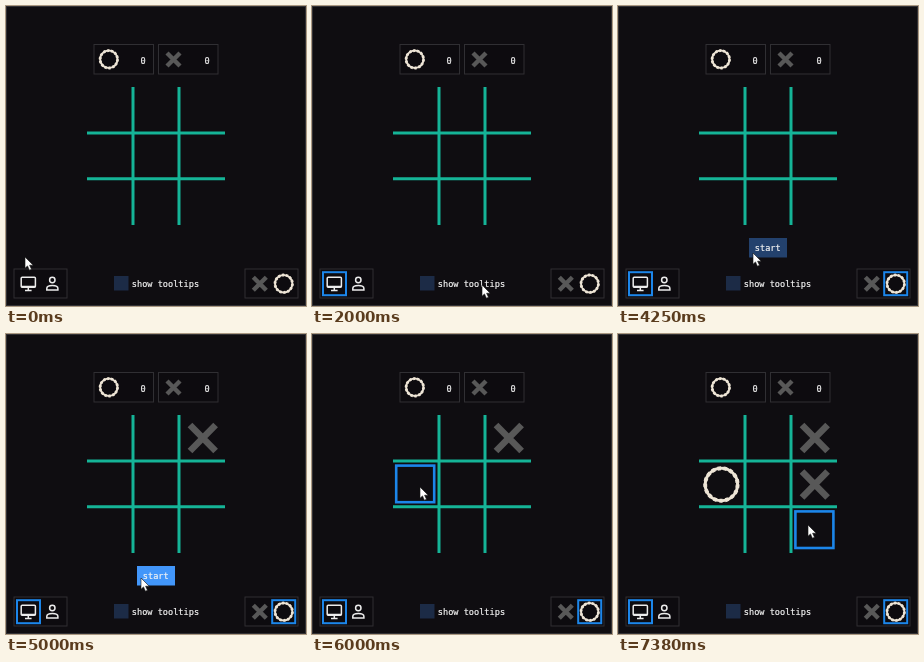
Recreate the animation shown at these times as an HTML page. Size 300 by 300 pixels, loop 8 s.

```html
<!DOCTYPE html>
<html lang="en">
<head>
<meta charset="utf-8">
<title>Tic-tac-toe</title>
<style>
  html, body { margin: 0; width: 100%; height: 100%; overflow: hidden; background: #0f0d11; }
  svg { display: block; width: 100%; height: 100%; }
  text { font: 8.6px "DejaVu Sans Mono", monospace; fill: #f4f4f4; stroke: #f4f4f4; stroke-width: .2; }
  .panel { fill: #0d0b0f; stroke: #302f33; }
  .grid { stroke: #15b497; stroke-width: 3; }
  .ring { fill: none; stroke: #eee5d6; }
  .cross { fill: none; stroke: #585858; }
  .mark { fill: none; stroke: #1c86ea; stroke-width: 2; }
  .cell { stroke-width: 2.6; }
  .icon { fill: none; stroke: #ececec; stroke-width: 1.5; }

  .pick, .move, .hover, #start, #pointer { animation: 8s step-end infinite; }
  .pick, .move, .hover, #start { opacity: 0; }

  #pc { animation-name: pc; }
  @keyframes pc { 0% { opacity: 0 } 12.5%, 100% { opacity: 1 } }
  #side { animation-name: side; }
  @keyframes side { 0% { opacity: 0 } 46.875%, 100% { opacity: 1 } }

  #start { animation-name: start; }
  @keyframes start {
    0% { opacity: 0; fill: #23416d }
    46.875% { opacity: 1; fill: #23416d }
    54.6875% { opacity: 1; fill: #4296fa }
    64.0625%, 100% { opacity: 0; fill: #23416d }
  }

  #first { animation-name: first; }
  @keyframes first { 0% { opacity: 0 } 62.5%, 100% { opacity: 1 } }
  #second { animation-name: second; }
  @keyframes second { 0% { opacity: 0 } 82.8125%, 100% { opacity: 1 } }

  #low { animation-name: low; }
  @keyframes low { 0% { opacity: 0 } 71.875% { opacity: 1 } 73.4375%, 100% { opacity: 0 } }
  #left { animation-name: left; }
  @keyframes left { 0% { opacity: 0 } 73.4375% { opacity: 1 } 90.625%, 100% { opacity: 0 } }
  #corner { animation-name: corner; }
  @keyframes corner { 0% { opacity: 0 } 92.1875%, 100% { opacity: 1 } }

  #pointer { animation-name: pointer; }
  @keyframes pointer {
    0% { transform: translate(19px, 251px) }
    1.5625% { transform: translate(18px, 266px) }
    3.125% { transform: translate(18px, 275px) }
    21.875% { transform: translate(31px, 276px) }
    23.4375% { transform: translate(90px, 279px) }
    25% { transform: translate(170px, 279px) }
    26.5625% { transform: translate(234px, 277px) }
    28.125% { transform: translate(254px, 275px) }
    39.0625% { transform: translate(267px, 275px) }
    40.625% { transform: translate(275px, 275px) }
    51.5625% { transform: translate(225px, 262px) }
    53.125% { transform: translate(135px, 247px) }
    54.6875% { transform: translate(133px, 246px) }
    57.8125% { transform: translate(135px, 244px) }
    70.3125% { transform: translate(132px, 236px) }
    71.875% { transform: translate(118px, 195px) }
    73.4375% { transform: translate(110px, 160px) }
    75% { transform: translate(108px, 153px) }
    89.0625% { transform: translate(118px, 157px) }
    90.625% { transform: translate(172px, 183px) }
    92.1875%, 100% { transform: translate(190px, 191px) }
  }
</style>
</head>
<body>
<svg viewBox="0 0 300 300">
  <defs>
    <g id="o" class="ring">
      <circle r="8.7" stroke-width="2"/>
      <circle r="8.7" stroke-width="2.8" stroke-dasharray="2.2 1.7"/>
    </g>
    <path id="x" class="cross" d="M-6.5-6.5 6.5 6.5M6.5-6.5-6.5 6.5" stroke-width="4.4"/>
    <path id="bigX" class="cross" d="M-12.8-13 12.8 13M12.8-13-12.8 13" stroke-width="6.6"/>
    <rect id="cell" class="mark cell" width="38" height="36.6"/>
  </defs>

  <rect width="300" height="300" fill="#0f0d11"/>
  <rect x=".5" y=".5" width="299" height="299" fill="none" stroke="#323135"/>

  <!-- score -->
  <rect class="panel" x="88" y="38.5" width="59.5" height="29.5"/>
  <rect class="panel" x="152.5" y="38.5" width="59.5" height="29.5"/>
  <use href="#o" x="102.8" y="53.3"/>
  <use href="#x" x="167.5" y="53.5"/>
  <text x="134.4" y="58">0</text>
  <text x="198.6" y="58">0</text>

  <!-- board -->
  <path class="grid" d="M127 81V219M173 81V219M81 127H219M81 172.8H219"/>
  <g class="hover" id="low"><use href="#cell" x="84.2" y="177.4"/></g>
  <g class="hover" id="left"><use href="#cell" x="84.2" y="131.6"/></g>
  <g class="hover" id="corner"><use href="#cell" x="177.4" y="177.4"/></g>
  <g class="move" id="first"><use href="#bigX" x="196.8" y="104"/></g>
  <g class="move" id="second">
    <use href="#bigX" x="196.8" y="150.5"/>
    <g class="ring" transform="translate(103.4 150.5)">
      <circle r="16.2" stroke-width="3"/>
      <circle r="16.2" stroke-width="3.9" stroke-dasharray="3.4 2.6"/>
    </g>
  </g>

  <!-- controls -->
  <g id="start">
    <rect x="131" y="232" width="38" height="19.5"/>
    <text x="136.8" y="245">start</text>
  </g>
  <rect x="108" y="270" width="14.5" height="14.5" fill="#1c2b46"/>
  <text x="125.8" y="280.5">show tooltips</text>

  <rect class="panel" x="8" y="263" width="53" height="29"/>
  <g class="icon">
    <rect x="15.2" y="271.2" width="14.2" height="10" rx="1"/>
    <path d="M15 280.6H29.5M22.3 281V284M19 284.4H25.6"/>
    <circle cx="46.3" cy="274" r="2.7"/>
    <path d="M40.8 284V282.4C40.8 278.4 51.9 278.4 51.9 282.4V284Z"/>
  </g>
  <rect class="mark pick" id="pc" x="11" y="266.2" width="23" height="23"/>

  <rect class="panel" x="239" y="263" width="53" height="29"/>
  <use href="#x" x="253.8" y="277.7"/>
  <use href="#o" x="277.7" y="277.7"/>
  <rect class="mark pick" id="side" x="266.2" y="266.2" width="23" height="23"/>

  <path id="pointer" d="M0 0V11.2L2.5 8.9 4.4 13.2 6.5 12.3 4.6 8.2H8.2Z" fill="#fff" stroke="#151515" stroke-width=".6"/>
</svg>
</body>
</html>
```
